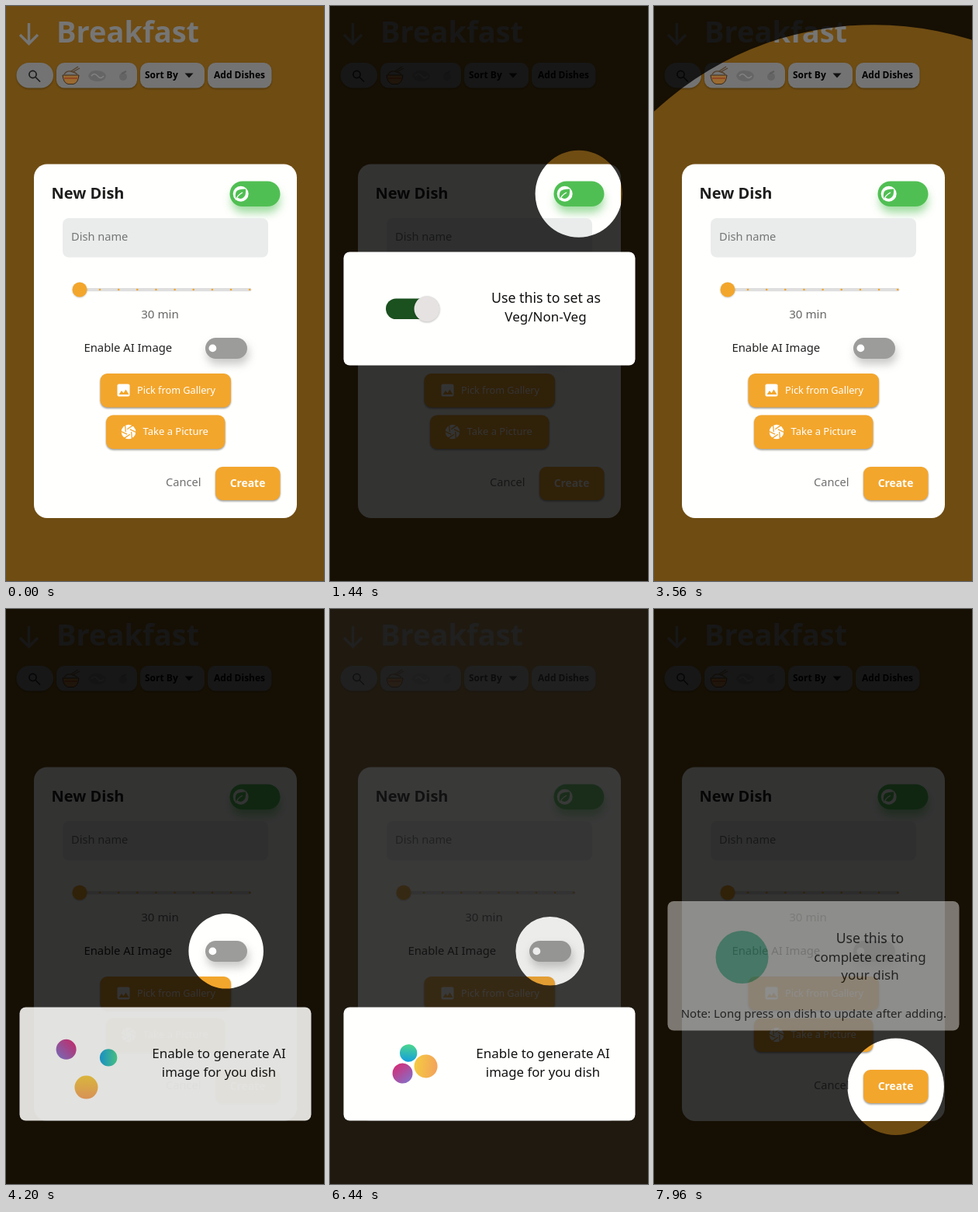
An HTML page for the animation above (8 s loop, 410x740 px).

```html
<!DOCTYPE html>
<html lang="en">
<head>
<meta charset="utf-8">
<title>New dish tour</title>
<style>
  html, body { margin: 0; width: 100%; height: 100%; overflow: hidden; background: #6f4c12; }
  svg { display: block; width: 410px; height: 740px; }
  text { font-family: "Noto Sans", "Open Sans", sans-serif; }
</style>
</head>
<body>
<svg id="stage" viewBox="0 0 410 740" xmlns="http://www.w3.org/2000/svg">
  <defs>
    <filter id="glow" x="-40%" y="-60%" width="180%" height="260%"><feGaussianBlur stdDeviation="6"/></filter>
    <filter id="soft" x="-10%" y="-20%" width="120%" height="150%"><feGaussianBlur stdDeviation="1"/></filter>
    <linearGradient id="pink" x1="1" y1="0" x2="0" y2="1">
      <stop offset=".15" stop-color="#d0317b"/><stop offset="1" stop-color="#7b78d2"/>
    </linearGradient>
    <linearGradient id="cyan" x1="0" y1="0" x2="1" y2="0">
      <stop offset="0" stop-color="#159fdc"/><stop offset="1" stop-color="#4bd68e"/>
    </linearGradient>
    <linearGradient id="gold" x1="0" y1="0" x2="0" y2="1">
      <stop offset="0" stop-color="#f5cb3f"/><stop offset="1" stop-color="#f3a25c"/>
    </linearGradient>
  </defs>
  <rect width="410" height="740" fill="#6f4c12"/>
  <g id="page"></g>
  <g id="modal"></g>
  <path id="shade" fill="#000" fill-opacity=".8" fill-rule="evenodd"/>
  <rect id="press" width="410" height="740" fill="#656565"/>
  <g id="cards"></g>
</svg>
<script>
const LOOP = 8000, STEP = 40, FOCUS = 600, PULSE = 600, FADE = 250;
const ORANGE = '#f3a62c';
const $ = id => document.getElementById(id);

// Markup helpers
const text = (x, y, s, size, { weight = 500, fill = '#111', anchor = 'start' } = {}) =>
  `<text x="${x}" y="${y}" font-size="${size}" font-weight="${weight}" fill="${fill}" text-anchor="${anchor}">${s}</text>`;
const box = (x, y, w, h, r, fill, extra = '') =>
  `<rect x="${x}" y="${y}" width="${w}" height="${h}" rx="${r}" fill="${fill}" ${extra}/>`;
const dot = (x, y, r, fill, extra = '') =>
  `<circle cx="${x}" cy="${y}" r="${r}" fill="${fill}" ${extra}/>`;
const button = (x, y, w, h) =>
  box(x, y + 1.5, w, h, 9, '#000', 'opacity=".4" filter="url(#soft)"') + box(x, y, w, h, 9, ORANGE);
const chip = (x, w, r) =>
  box(x, 74, w, 33, r, '#000', 'opacity=".25" filter="url(#soft)"') + box(x, 73, w, 32.5, r, '#737373');

function pageMarkup() {
  const bold = { weight: 700, fill: '#000' };
  return `<path d="M29.5 22V48M18 37L29.5 48.5L41 37" fill="none" stroke="#757575" stroke-width="3.4"/>`
    + text(65, 47, 'Breakfast', 38, { weight: 700, fill: '#757575' })
    + chip(13.5, 47.5, 16) + chip(65, 104, 10) + chip(173, 83, 10) + chip(260, 82.5, 10)
    + `<g fill="none" stroke="#1c1c1c" stroke-width="1.7"><circle cx="34.5" cy="88" r="4.6"/><path d="M38 91.5L44 97.5"/></g>`
    // noodle bowl, then two faded dishes
    + `<path d="M73 89H94Q93 99 87 100.5H80Q74 99 73 89Z" fill="#9a6a30" stroke="#3a2a1a"/>
       <path d="M75 88Q78 83 83.5 84T92 88M84 84L93 78M86 85L95 80" fill="none" stroke="#54402a" stroke-width="1.3"/>
       <path d="M75 93H92" stroke="#8a2f1d" stroke-width="1.2"/>
       <path d="M106 90Q108 83 116 83Q127 83 129 90Q128 97 118 97Q108 97 106 90Z" fill="#656565"/>
       <path d="M110 90Q114 85 118 90T126 90" fill="none" stroke="#828282" stroke-width="1.5"/>
       <circle cx="151" cy="91" r="5" fill="#646464"/><path d="M149 87L155 84" stroke="#5c5c5c" stroke-width="2"/>`
    + text(179, 93, 'Sort By', 12, bold)
    + `<path d="M230.5 86.5H241.5L236 92.5Z" fill="#111"/>`
    + text(268, 93, 'Add Dishes', 12, bold);
}

function modalMarkup() {
  const white = { fill: '#fff' };
  let ticks = '';
  for (let i = 0; i < 9; i++) ticks += dot(121 + i * 24.15, 365, 1.3, ORANGE);
  let blades = '';
  for (let i = 0; i < 6; i++)
    blades += `<path d="M-1.8 -3.2L6 -8.6" transform="rotate(${i * 60})"/>`;
  return box(36, 203.5, 339, 455.5, 17, '#fffffd')
    + text(58.5, 248, 'New Dish', 20, { weight: 700, fill: '#1d1d1d' })
    + box(291, 235, 62, 31, 15, '#4fbe52', 'opacity=".55" filter="url(#glow)"')
    + box(288.5, 225.5, 65, 32.5, 16.2, '#50bf53')
    + dot(302.7, 241.8, 10, '#fff')
    + `<path d="M296.5 248Q294 238 300.5 236.5Q304 235.5 309 235.5Q310 244 305.5 247Q301.500 249 298.500 246.500Z" fill="#50bf53"/>
       <path d="M296 249.500Q299 243 305 240" fill="none" stroke="#fff" stroke-width="1.300"/>`
    + box(73, 273, 265, 50.5, 8, '#eaecec')
    + text(84, 302, 'Dish name', 14.6, { fill: '#757575' })
    + box(94, 363, 222.5, 4.2, 2, '#dedede') + ticks
    + dot(95, 365.8, 9.3, '#000', 'opacity=".25" filter="url(#soft)"') + dot(95, 365, 9.5, ORANGE)
    + text(198.5, 402, '30 min', 15.1, { fill: '#666', anchor: 'middle' })
    + text(100.5, 445, 'Enable AI Image', 14.8, { fill: '#222' })
    + box(259, 434, 54, 27, 13, '#777', 'opacity=".4" filter="url(#glow)"')
    + box(257, 427, 54, 27, 13.5, '#9c9c9a') + dot(266.4, 440.4, 4.9, '#fff')
    + button(121.5, 473, 168.5, 43.5)
    + box(143.500, 486.500, 16, 16, 2, '#fff')
    + `<path d="M145.500 500L149 495L151.500 498L154.500 493.500L158.500 500Z" fill="${ORANGE}"/>`
    + text(169, 498.5, 'Pick from Gallery', 12.7, white)
    + button(129, 526.5, 153.5, 43.5)
    + `<g transform="translate(158 548)">${dot(0, 0, 9.3, '#fff')}<g stroke="${ORANGE}" stroke-width="1.300">${blades}</g></g>`
    + text(176.5, 552, 'Take a Picture', 13, white)
    + text(206, 618, 'Cancel', 14.6, { fill: '#707070' })
    + button(270, 593, 83.5, 43)
    + text(311.5, 619, 'Create', 13.9, { weight: 700, fill: '#fff', anchor: 'middle' });
}

const mid = { anchor: 'middle' };
const cardBox = (y, h) => box(17.5, y, 376, h, 8, '#fffffd');
const cardMarkup = [
  cardBox(316.5, 146)
    + box(72, 376.5, 69, 26.5, 13.2, '#1b501f')
    + dot(88, 390.7, 16.5, '#000', 'id="knobShadow" opacity=".25" filter="url(#soft)"')
    + dot(88, 389.7, 16.5, '#e5e2e1', 'id="knob"')
    + text(278.5, 382, 'Use this to set as', 17.8, mid)
    + text(278, 406, 'Veg/Non-Veg', 17, mid),
  cardBox(512.5, 146)
    + '<g id="balls"></g>'
    + text(274.5, 578, 'Enable to generate AI', 17, mid)
    + text(274.5, 602, 'image for you dish', 16.8, mid),
  cardBox(376, 166.5)
    + dot(113.5, 448, 34, '#62cfa8')
    + text(278.5, 430, 'Use this to', 17.6, mid)
    + text(278.5, 453.5, 'complete creating', 17, mid)
    + text(278.5, 477, 'your dish', 17, mid)
    + text(205.8, 525.5, 'Note: Long press on dish to update after adding.', 15, mid)
];

// Tour stops: spotlight centre, resting radius, opening and closing times
const stops = [
  { x: 320.7, y: 241.8, r: 49.2, from: 45, to: 2785 },
  { x: 283.7, y: 440.3, r: 43.7, from: 3385, to: 6650 },
  { x: 311.7, y: 614.7, r: 60.3, from: 7250, to: Infinity }
];

// Angle, wide and narrow distance, radius
const balls = [
  { angle: -144, far: 32.6, near: 15.4, r: 13, fill: 'pink' },
  { angle: -17, far: 29.4, near: 14.6, r: 11.2, fill: 'cyan' },
  { angle: 91, far: 29.6, near: 19.6, r: 15, fill: 'gold' }
];

$('page').innerHTML = pageMarkup();
$('modal').innerHTML = modalMarkup();
$('cards').innerHTML = cardMarkup.map(m => `<g>${m}</g>`).join('');
$('balls').innerHTML = balls.map(b => dot(0, 0, b.r, `url(#${b.fill})`)).join('');
const cards = [...$('cards').children];
const ballNodes = [...$('balls').children];

const clamp = v => Math.max(0, Math.min(1, v));
const ramp = (t, start, length) => clamp((t - start) / length);
const smooth = v => v * v * (3 - 2 * v);

// cubic-bezier(.25, .1, .25, 1)
function ease(x) {
  if (x <= 0 || x >= 1) return clamp(x);
  const curve = (s, a, b) => 3 * (1 - s) ** 2 * s * a + 3 * (1 - s) * s * s * b + s ** 3;
  let lo = 0, hi = 1;
  for (let i = 0; i < 24; i++) {
    const s = (lo + hi) / 2;
    if (curve(s, .25, .25) < x) lo = s; else hi = s;
  }
  return curve(lo, .1, 1);
}

function spotlight(stop, t) {
  const open = stop.from + FOCUS;
  if (t < open) return stop.r + 740 * (1 - ease(ramp(t, stop.from, FOCUS)));
  if (t >= stop.to) return stop.r + 740 * (1 - ease(1 - ramp(t, stop.to, FOCUS)));
  const phase = ((t - open) / PULSE) % 2;
  return stop.r + 7.4 * ease(phase < 1 ? phase : 2 - phase);
}

function drawToggle(t) {
  const on = smooth(ramp(t, 1100, 250)) - smooth(ramp(t, 1900, 250));
  $('knob').setAttribute('cx', 88 + 37 * on);
  $('knobShadow').setAttribute('cx', 88 + 37 * on);
}

function drawBalls(t) {
  const time = t - 4200;
  const spread = .5 + .5 * Math.cos(time / 1460 * 2 * Math.PI);
  $('balls').setAttribute('transform', `translate(104 586) rotate(${time / 2922 * 360})`);
  balls.forEach((b, i) => {
    const d = b.near + (b.far - b.near) * spread, a = b.angle * Math.PI / 180;
    ballNodes[i].setAttribute('cx', d * Math.cos(a));
    ballNodes[i].setAttribute('cy', d * Math.sin(a));
  });
}

function draw(t) {
  let hole = '', press = 0;
  stops.forEach((s, i) => {
    if (t >= s.from && t < s.to + FOCUS) {
      const r = spotlight(s, t);
      hole = `M0 0H410V740H0ZM${s.x - r} ${s.y}a${r} ${r} 0 1 0 ${2 * r} 0a${r} ${r} 0 1 0 ${-2 * r} 0Z`;
    }
    press = Math.max(press, ramp(t, s.to - 340, 130) * (1 - ramp(t, s.to, 200)));
    const shown = ramp(t, s.from + FOCUS, FADE) * (1 - ramp(t, s.to, FADE));
    cards[i].setAttribute('opacity', shown);
  });
  $('shade').setAttribute('d', hole);
  $('press').setAttribute('opacity', .12 * press);
  drawToggle(t);
  drawBalls(t);
}

const begin = performance.now();
function tick() {
  const t = (performance.now() - begin) % LOOP;
  draw(Math.floor(t / STEP) * STEP);
  requestAnimationFrame(tick);
}
draw(0);
requestAnimationFrame(tick);
</script>
</body>
</html>
```
